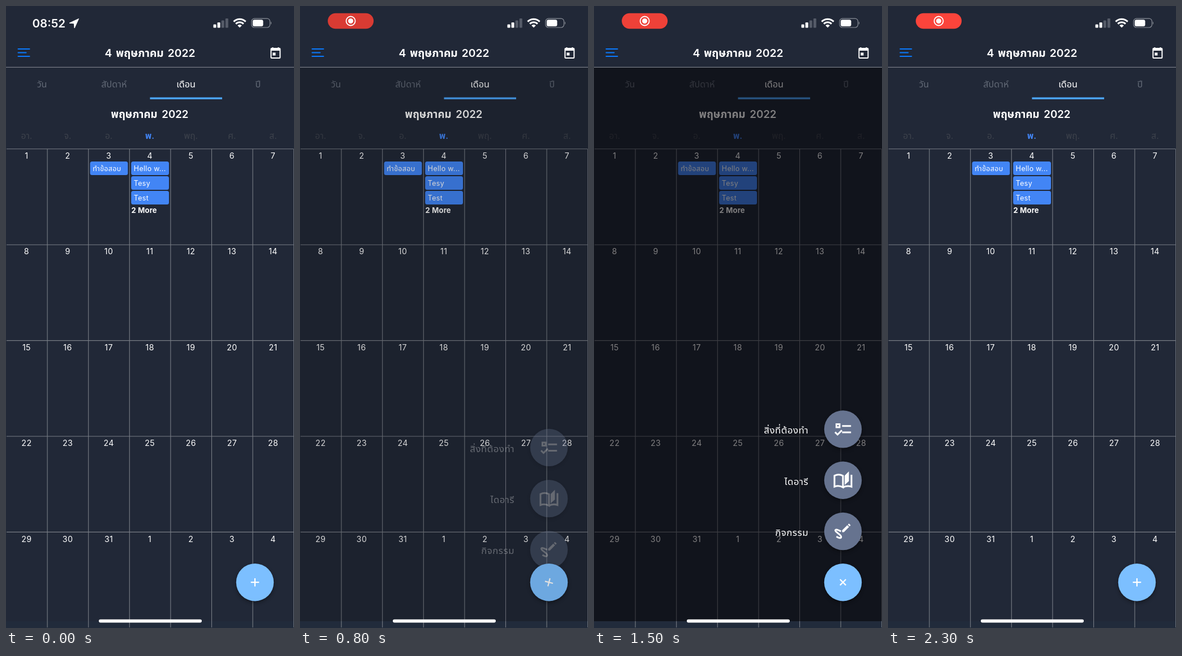
Animation, 509 px wide and 1100 px high, one loop 2.4 s. Source, as an HTML page:

```html
<!DOCTYPE html>
<html lang="th">
<head>
<meta charset="utf-8">
<title>ปฏิทิน</title>
<style>
  html, body { margin: 0; width: 100%; height: 100%; overflow: hidden; background: #212837; }
  svg { display: block; width: 100vw; height: 100vh; }
  text { font-family: Inter, "Noto Sans Thai Looped", "Noto Sans Thai", "Noto Sans", sans-serif; fill: #fff; }
  .mid { text-anchor: middle; }
  .end { text-anchor: end; }
  .head { font-size: 19.3px; font-weight: 600; }
  .month { font-size: 18.7px; font-weight: 600; }
  .tab { font-size: 16.2px; fill: #626976; }
  .week { font-size: 15.5px; fill: #3d424c; }
  .day { font-size: 14.2px; letter-spacing: .4px; }
  .event { font-size: 12.5px; letter-spacing: .3px; }
  .label { font-size: 16.8px; letter-spacing: .5px; }
  .on { fill: #fff; }
  .today { fill: #4285f5; font-weight: 600; }
  .raised { filter: drop-shadow(0 3px 3px rgba(0, 0, 0, .38)); }
  .line { fill: none; stroke: #fff; }
</style>
</head>
<body>
<svg viewBox="0 0 509 1100" preserveAspectRatio="none">
  <rect width="509" height="1100" fill="#212837"/>
  <rect y="1088" width="509" height="12" fill="#212b3b"/>

  <g id="clock">
    <text x="46.5" y="38" font-size="20.5" font-weight="600">08:52</text>
    <path d="M128.5 22.5 112 30.2l8.3.7.7 8.1z" fill="#fff" stroke="#fff" stroke-linejoin="round"/>
  </g>
  <g id="pill">
    <rect id="pillBody" x="-40.5" y="-13.7" width="81" height="27.4" rx="13.7"/>
    <circle r="8" class="line" stroke-width="1.8"/>
    <circle r="4.5" fill="#fff"/>
  </g>

  <g id="signal"></g>
  <g fill="#fff">
    <path d="M409.2 34.4a5.4 5.4 0 0 1 7.6 0l-3.8 3.8z"/>
    <g class="line" stroke-width="3">
      <path d="M402.4 27.6a15 15 0 0 1 21.2 0"/>
      <path d="M406.2 31.6a9.7 9.7 0 0 1 13.6 0"/>
    </g>
    <rect x="434" y="22.2" width="32.5" height="15.8" rx="5" fill="none" stroke="#8b9099" stroke-width="1.2"/>
    <rect x="436" y="24.2" width="18.5" height="11.8" rx="3"/>
    <path d="M468 27.3q2.4 2.8 0 5.6z" fill="#8b9099"/>
  </g>

  <path d="M21.5 76H41.5M21.5 82.5H35.5M21.5 89H41.5" stroke="#0a7aff" stroke-width="2.1" stroke-linecap="round"/>
  <g transform="translate(476.4 83)" class="line" stroke-width="2">
    <rect x="-8" y="-8" width="16" height="17" rx="1"/>
    <path d="M-8-6H8" stroke-width="4"/>
    <path d="M-5-10v3M5-10v3"/>
    <rect x="-5" y="-.5" width="5" height="5" fill="#fff" stroke="none"/>
  </g>
  <g class="head">
    <text x="174.5" y="90">4</text>
    <text x="236.5" y="90" class="mid">พฤษภาคม</text>
    <text x="334.5" y="90" class="end">2022</text>
  </g>
  <g class="month">
    <text x="226.6" y="197.7" class="mid">พฤษภาคม</text>
    <text x="322.5" y="197.7" class="end">2022</text>
  </g>
  <path d="M0 108.3H509" stroke="#8a8e96"/>
  <rect x="254.5" y="161.5" width="127.5" height="3.5" fill="#4ba2f5"/>

  <g id="calendar"></g>
  <rect id="shade" y="109" width="509" height="979" fill="#030003"/>
  <g id="menu"></g>

  <g transform="translate(440 1019.2)">
    <circle r="33.2" fill="#7cbfff" class="raised"/>
    <path id="cross" d="M-7.3 0H7.3M0-7.3V7.3" class="line" stroke-width="2.2"/>
    <circle id="press" r="33.2"/>
  </g>
  <rect x="164" y="1084.8" width="182" height="5.6" rx="2.8" fill="#fff"/>
</svg>

<script>
const LOOP = 2400, STEP = 100;
const $ = id => document.getElementById(id);
const times = (n, make) => Array.from({ length: n }, (_, i) => make(i)).join('');
const text = (x, y, cls, str) => `<text x="${x}" y="${y}" class="${cls}">${str}</text>`;

const COL = 72.6, ROW = 169.4, TOP = 252.8;
const midX = i => 36.4 + COL * i;

function signal() {
  return times(4, i => {
    const height = 6 + 3.5 * i;
    return `<rect x="${366.5 + 7.1 * i}" y="${38.5 - height}" width="5" height="${height}" rx="1.2"
      fill="${i < 2 ? '#fff' : '#555b68'}"/>`;
  });
}

function event(col, row, str) {
  const x = 3.4 + COL * col, y = 275 + 26 * row;
  return `<rect x="${x}" y="${y}" width="66.8" height="24" rx="3.5" fill="#4285f5"/>` +
    text(x + 4.6, y + 16.5, 'event', str);
}

function calendar() {
  const tabs = ['วัน', 'สัปดาห์', 'เดือน', 'ปี'].map((name, i) =>
    text(63.6 + 127.25 * i, 143.5, 'mid tab' + (i === 2 ? ' on' : ''), name));
  const weekdays = ['อา.', 'จ.', 'อ.', 'พ.', 'พฤ.', 'ศ.', 'ส.'].map((name, i) =>
    text(midX(i), 234.5, 'mid week' + (i === 3 ? ' today' : ''), name));
  const grid = times(5, r => `M1 ${TOP + ROW * r}H508`) +
    times(7, c => `M${0.5 + COL * (c + 1)} ${TOP}V1099`);
  const days = times(35, n =>
    text(midX(n % 7), TOP + 17.2 + ROW * Math.floor(n / 7), 'mid day', n % 31 + 1));
  const events = ['Hello w...', 'Tesy', 'Test'].map((str, i) => event(3, i, str));

  return [
    ...tabs, ...weekdays,
    `<path d="${grid}" fill="none" stroke="#787d85" stroke-width="1.1"/>`,
    days, event(2, 0, 'ทำข้อสอบ'), ...events,
    '<text x="221.5" y="366" font-size="13" font-weight="700" letter-spacing=".2">2 More</text>'
  ].join('');
}

// Icons sit on a 24 unit square.
const ICONS = {
  list: '<path d="M4.3 6.1H8V9.8H4.3zM11 8.3H21.5M11 15.7H21.5M2.7 15.5l2.9 2.9 5.1-5.1"/>',
  book: `<path d="M2 19.6V6.6Q7 4 12 6.8V20.3Q7 17.5 2 19.6zM12 20.3Q17 17.7 22 19.6V5.5"/>
    <path d="M19 1.5l-5 5v11l5-4.5z" fill="#fff" stroke="none"/>`,
  draw: `<path d="M9.6 12.1C6.5 10.2 3 9.2 3 10.8C3 13.3 9.9 15.5 9.9 18.6C9.9 20.9 6.5 19.6 4.3 18.2"/>
    <path d="M11 10.9V13h2.1l6.1-6.1-2.1-2.1zM17.8 4.2l1.3-1.3 2 2-1.3 1.3z" fill="#fff" stroke="none"/>`
};
const ACTIONS = [['สิ่งที่ต้องทำ', 'list'], ['ไดอารี', 'book'], ['กิจกรรม', 'draw']];

function menu() {
  return ACTIONS.map(([name, icon], i) => `
    <g transform="translate(440 ${748.4 + 90.3 * i})">
      <circle r="33.2" fill="#66738f" class="raised"/>
      <g transform="translate(-18 -18) scale(1.5)" class="line" stroke-width="2">${ICONS[icon]}</g>
      ${text(-61, 8, 'end label', name)}
    </g>`).join('');
}

$('signal').innerHTML = signal();
$('calendar').innerHTML = calendar();
$('menu').innerHTML = menu();

function ease(t, start, duration) {
  const x = Math.min(1, Math.max(0, (t - start) / duration));
  return x * x * (3 - 2 * x);
}
const bump = (t, peak) => Math.exp(-(((t - peak) / 110) ** 2));

function set(id, attrs) {
  for (const name in attrs) $(id).setAttribute(name, attrs[name]);
}

function draw(time) {
  const t = Math.floor(time % LOOP / STEP) * STEP;
  const open = ease(t, 705, 250) - ease(t, 1860, 250);
  const size = 0.85 + 0.15 * ease(t, 100, 400);
  const glow = 0.925 - 0.075 * Math.cos(2 * Math.PI * (t - 850) / LOOP);

  set('clock', { opacity: 1 - ease(t, 50, 250) });
  set('pill', { opacity: ease(t, 100, 300), transform: `translate(89.6 26.5) scale(${size})` });
  set('pillBody', { fill: `rgb(${255 * glow}, ${69 * glow}, ${60 * glow})` });
  set('shade', { opacity: 0.5 * open });
  set('menu', { opacity: open, transform: `translate(0 ${48 * (1 - open)})` });
  set('cross', { transform: `rotate(${45 * open})` });
  set('press', { opacity: 0.12 * (bump(t, 800) + bump(t, 1930)) });
}

const start = performance.now();
function tick() {
  draw(performance.now() - start);
  requestAnimationFrame(tick);
}
tick();
</script>
</body>
</html>
```
